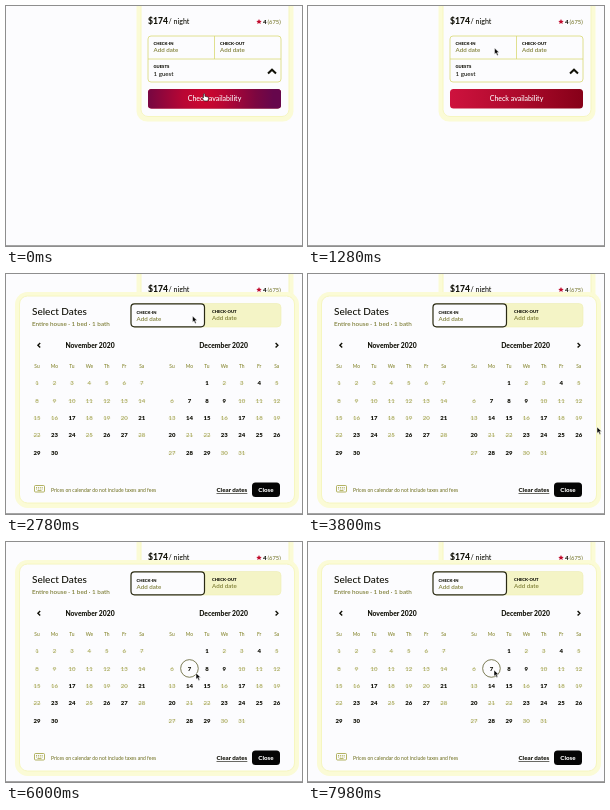
An HTML page that plays this animation: 296x240 px, repeating every 8000 ms.

```html
<!DOCTYPE html>
<html lang="en">
<head>
<meta charset="utf-8">
<title>Stay booking</title>
<style>
  html, body { margin: 0; width: 100%; height: 100%; overflow: hidden; background: #fcfcfe; }
  svg { display: block; width: 100vw; height: 100vh; }
  text { font: 500 6.2px Lato, Inter, sans-serif; fill: #111108; }
  .bold { font-weight: 800; }
  .label { font-size: 4.2px; font-weight: 900; }
  .soft { fill: #77772c; }
  .mid { text-anchor: middle; }
  .halo { fill: none; stroke: #fbfbd6; stroke-width: 5; }
  .panel { fill: #fcfcfe; stroke: #f6f6c0; stroke-width: 1; }
  .line { fill: none; stroke: #d8d874; stroke-width: .8; }
  .chevron { fill: none; stroke: #111108; stroke-width: 1.4; }
  .week { font-size: 4.9px; fill: #85852c; }
  .day { font-size: 6px; font-weight: 900; }
  .taken { font-weight: 400; fill: #9c9c44; }
  .strike { stroke: #b4b464; stroke-width: .35; }
</style>
</head>
<body>
<svg viewBox="0 0 296 240">
  <defs>
    <linearGradient id="rest">
      <stop stop-color="#ce123e"/><stop offset=".5" stop-color="#ae0a2c"/><stop offset="1" stop-color="#860018"/>
    </linearGradient>
    <radialGradient id="glow" gradientUnits="userSpaceOnUse" cx="198" cy="91" r="70">
      <stop stop-color="#d0062e"/><stop offset=".3" stop-color="#b80634"/>
      <stop offset=".75" stop-color="#7c0640"/><stop offset="1" stop-color="#66064c"/>
    </radialGradient>
  </defs>
  <path d="M0 239.5H296" stroke="#a4a4a4"/>

  <g id="card">
    <rect class="halo" x="133" y="-12" width="152" height="125" rx="8"/>
    <rect class="panel" x="135" y="-12" width="148" height="122.5" rx="7"/>
    <text class="bold" x="142" y="18" style="font-size:8.6px">$174</text>
    <text x="162.5" y="18" style="font-size:7.1px">/ night</text>
    <path d="M253 13l.8 1.7 1.9.2-1.4 1.3.4 1.9-1.7-1-1.7 1 .4-1.9-1.4-1.3 1.9-.2z" fill="#c00a2c"/>
    <text class="bold" x="257" y="18">4</text>
    <text class="soft" x="261.5" y="18" style="font-size:5.8px">(675)</text>
    <rect class="line" x="142" y="30" width="133" height="46" rx="3"/>
    <path class="line" d="M142 53H275M208.5 30V53"/>
    <text class="label" x="147.5" y="39">CHECK-IN</text>
    <text class="soft" x="147.5" y="46">Add date</text>
    <text class="label" x="214" y="39">CHECK-OUT</text>
    <text class="soft" x="214" y="46">Add date</text>
    <text class="label" x="147.5" y="62">GUESTS</text>
    <text x="147.5" y="70">1 guest</text>
    <path class="chevron" d="M262 67.5l4-3.8 4 3.8" style="stroke-width:2"/>
    <rect x="142" y="83" width="133" height="19.5" rx="3.5" fill="url(#rest)"/>
    <rect id="hoverFill" x="142" y="83" width="133" height="19.5" rx="3.5" fill="url(#glow)"/>
    <text class="mid" x="208.5" y="95" style="font-size:7px;fill:#fff">Check availability</text>
  </g>

  <g id="modal">
    <rect class="halo" x="11.5" y="20.5" width="279" height="211" rx="10"/>
    <rect class="panel" x="13.5" y="22" width="275" height="207" rx="8"/>
    <text x="26" y="41" style="font-size:10px">Select Dates</text>
    <text class="soft" x="26" y="52" style="font-size:6.3px">Entire house · 1 bed · 1 bath</text>
    <rect x="125" y="29.5" width="150" height="23.5" rx="4" fill="#f4f4c6" stroke="#eeeeb4" stroke-width=".6"/>
    <rect x="125" y="29.8" width="73.5" height="23" rx="3.5" fill="#fcfcfe" stroke="#2a2a14" stroke-width="1.2"/>
    <text class="label" x="130.5" y="39.5">CHECK-IN</text>
    <text class="soft" x="130.5" y="46.5">Add date</text>
    <text class="label" x="206" y="39">CHECK-OUT</text>
    <text class="soft" x="206" y="46">Add date</text>
    <path class="chevron" d="M34.2 69l-2.3 2.3 2.3 2.3M269.6 69l2.3 2.3-2.3 2.3"/>
    <circle id="ring" r="8.8" fill="#fcfcfe" stroke="#5c5c2c" stroke-width=".8"/>
    <g id="months"></g>
    <g fill="none" stroke="#a0a03c" stroke-width=".8">
      <rect x="28.5" y="211.5" width="10" height="6.5" rx="1"/>
      <path d="M30 213.5h7M30 215h7" stroke-dasharray="1 .9"/>
      <path d="M31.5 216.6h4"/>
    </g>
    <text class="soft" x="45" y="217.8" style="font-size:5px">Prices on calendar do not include taxes and fees</text>
    <text class="bold" x="210.5" y="218" text-decoration="underline">Clear dates</text>
    <rect x="246" y="208.5" width="28" height="14.5" rx="3.5" fill="#050505"/>
    <text class="bold mid" x="260" y="218" style="fill:#fff">Close</text>
  </g>

  <g id="cursor" stroke-linejoin="round">
    <path id="arrow" d="M0 0V6.2L1.5 4.9L2.6 7.4L3.8 6.9L2.7 4.5H4.7Z" fill="#080808" stroke="#fff" stroke-width=".5"/>
    <path id="hand" d="M0 0.5Q.8-.4 1.4.5V2.8L4.5 3.5Q5.2 3.9 5 5L4.3 7.5H.8L-1.6 4.6Q-1.5 3.7 0 4.4Z" fill="#fff" stroke="#181010" stroke-width=".6"/>
  </g>
</svg>
<script>
const $ = id => document.getElementById(id);
const LOOP = 8000, STEP = 17.45, FIRST_ROW = 109;
const months = [
  { name: 'November 2020', x: 31, title: 84, offset: 0, days: 30, free: [17, 21, 23, 24, 26, 27, 29, 30] },
  { name: 'December 2020', x: 166, title: 217.5, offset: 2, days: 31,
    free: [1, 4, 7, 8, 9, 14, 15, 17, 20, 23, 24, 25, 26, 28, 29] }
];
const cells = [];

const label = (cls, x, y, text) => `<text class="mid ${cls}" x="${x}" y="${y}">${text}</text>`;

function drawMonth({ name, x, title, offset, days, free }) {
  let out = `<text class="bold mid" x="${title}" y="74" style="font-size:6.8px">${name}</text>`;
  ['Su', 'Mo', 'Tu', 'We', 'Th', 'Fr', 'Sa'].forEach((d, i) => out += label('week', x + i * STEP, 94, d));
  for (let d = 1; d <= days; d++) {
    const slot = d - 1 + offset;
    const cx = x + slot % 7 * STEP, cy = FIRST_ROW + Math.floor(slot / 7) * STEP;
    const open = free.includes(d);
    cells.push({ cx, cy });
    out += label(open ? 'day' : 'day taken', cx, cy + 2.1, d);
    if (!open) {
      const half = d < 10 ? 2 : 3.6;
      out += `<path class="strike" d="M${cx - half} ${cy + .2}h${half * 2}"/>`;
    }
  }
  return out;
}
$('months').innerHTML = months.map(drawMonth).join('');

// Pointer tip: [time, x, y]
const path = [
  [0, 197.5, 87.5], [150, 197.5, 87.5], [820, 186.5, 42], [2820, 186.5, 42],
  [3500, 289, 153], [3900, 289, 153], [4850, 210, 141], [5250, 210, 141],
  [5850, 190, 131], [6150, 190, 131], [6600, 186, 128], [LOOP, 186, 128]
];
const clamp = v => Math.min(1, Math.max(0, v));
const ease = v => v * v * (3 - 2 * v);

function tipAt(t) {
  const i = path.findIndex(p => p[0] > t);
  const [t0, x0, y0] = path[i - 1], [t1, x1, y1] = path[i];
  const k = ease((t - t0) / (t1 - t0));
  return [x0 + (x1 - x0) * k, y0 + (y1 - y0) * k];
}

function render(now) {
  const t = now % LOOP;
  const [x, y] = tipAt(t);
  const onButton = t < 1000 && y > 83;
  $('cursor').setAttribute('transform', `translate(${x} ${y})`);
  $('hand').style.display = onButton ? '' : 'none';
  $('arrow').style.display = onButton ? 'none' : '';
  $('glow').setAttribute('cx', x);
  $('hoverFill').style.opacity = t < 1000 ? clamp((y - 76) / 7) : 0;

  const shown = ease(clamp((t - 1640) / 240));
  $('modal').style.opacity = shown;
  const cell = shown === 1 &&
    cells.find(c => Math.abs(c.cx - x) < STEP / 2 && Math.abs(c.cy - y) < STEP / 2);
  $('ring').style.display = cell ? '' : 'none';
  if (cell) {
    $('ring').setAttribute('cx', cell.cx);
    $('ring').setAttribute('cy', cell.cy);
  }
}

const start = performance.now();
function tick() {
  render(performance.now() - start);
  requestAnimationFrame(tick);
}
tick();
</script>
</body>
</html>
```
